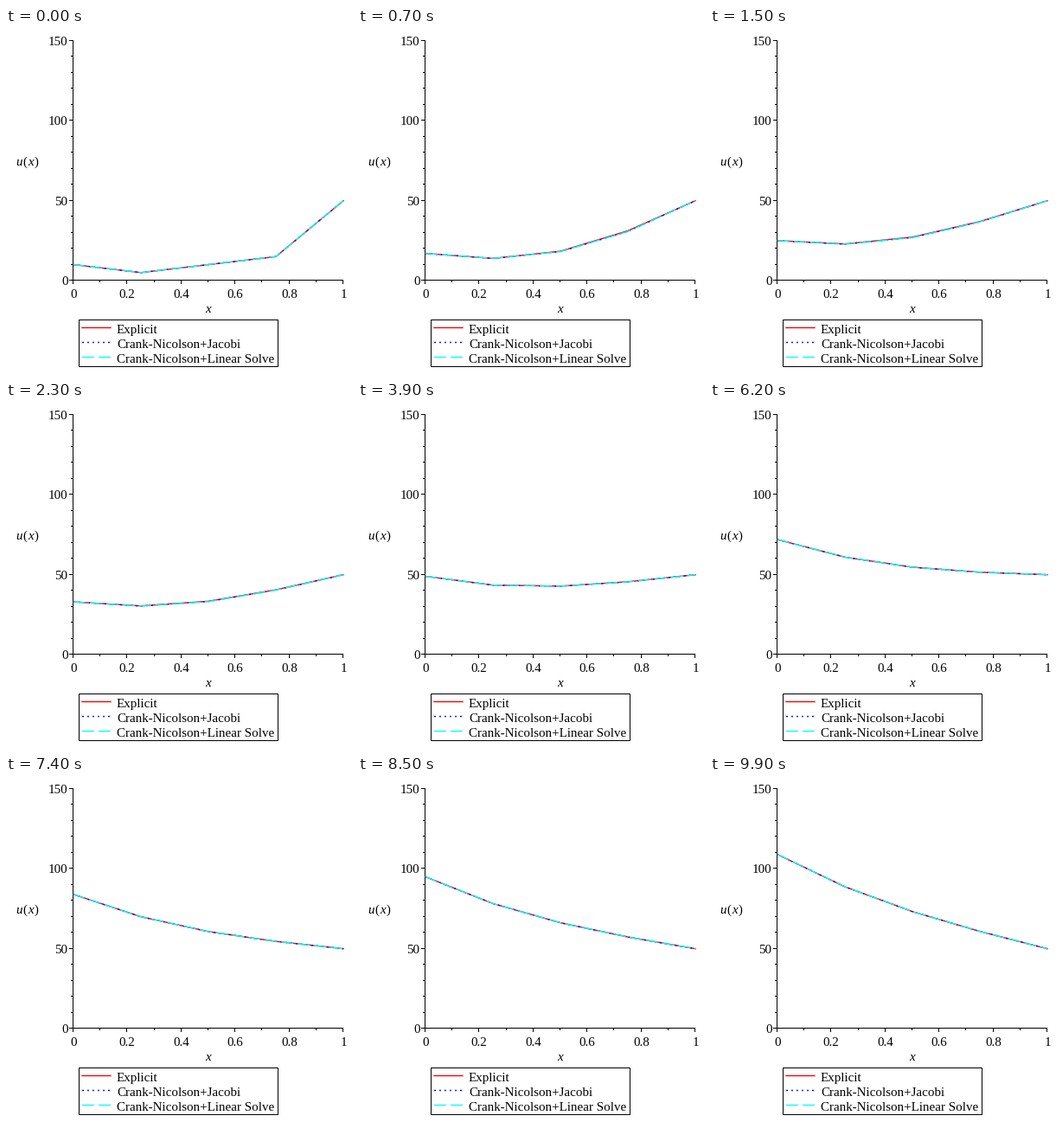
A matplotlib script that plays this animation: 400 by 400 pixels, repeating every 10000 ms.

```python
import matplotlib.pyplot as plt
import numpy as np
from matplotlib.animation import FuncAnimation
from matplotlib.patches import Rectangle

plt.rcParams.update({
    "font.family": "Liberation Serif",
    "lines.scale_dashes": False,
})

SIZE, DPI, STEPS = 400, 100, 100
PT = 72 / DPI
X0, X1, Y0, Y1 = 78, 390, 292, 15
U_MAX = 150
NODES = np.linspace(0, 1, 5)
R = 0.01 / 0.25 ** 2
STYLES = [("red", "-"),
          ("blue", (0, (2 * PT, 4 * PT))),
          ("cyan", (0, (14 * PT, 5 * PT)))]
NAMES = ["Explicit", "Crank-Nicolson+Jacobi", "Crank-Nicolson+Linear Solve"]


def px(x):
    return X0 + (X1 - X0) * x


def py(u):
    return Y0 + (Y1 - Y0) * u / U_MAX


def solve(theta):
    """Heat equation with a rising left end; theta weights the new time level."""
    lap = R * (np.diag([-2.0] * 3) + np.diag([1.0] * 2, 1) + np.diag([1.0] * 2, -1))
    eye = np.eye(3)
    u = np.array([5.0, 10.0, 15.0])
    rows = []
    for n in range(STEPS):
        rows.append([10 + n, *u, 50])
        edge = R * np.array([10 + n + theta, 0, 50])
        u = np.linalg.solve(eye - theta * lap, (eye + (1 - theta) * lap) @ u + edge)
    return np.array(rows)


explicit, crank = solve(0), solve(0.5)
runs = [explicit, crank, crank]

fig = plt.figure(figsize=(SIZE / DPI, SIZE / DPI), dpi=DPI, facecolor="white")
ax = fig.add_axes([0, 0, 1, 1])
ax.set(xlim=(0, SIZE), ylim=(SIZE, 0))
ax.axis("off")


def rule(x, y, w, h):
    """Solid black bar on whole pixels."""
    ax.add_patch(Rectangle((x, y), w, h, fc="black", lw=0, antialiased=False,
                           zorder=1))


def label(x, y, s, ha="center", style="normal"):
    ax.text(x, y, s, size=15 * PT, ha=ha, va="baseline", style=style)


def curve(x, y, style):
    color, dash = style
    return ax.plot(x, y, color=color, ls=dash, lw=1.4 * PT, snap=False,
                   solid_capstyle="projecting", dash_capstyle="butt", zorder=2)[0]


rule(X0 - 1, Y1 - 1, 1, Y0 - Y1 + 1)
rule(X0 - 1, Y0 - 1, X1 - X0 + 1, 1)

for i in range(16):
    y = round(py(10 * i))
    length = 2 if i % 5 else 4
    rule(X0 - 1 - length, y - 1, length, 1)
    if i % 5 == 0:
        label(71.5, y + 5, str(10 * i), ha="right")

for i in range(11):
    x = round(px(i / 10))
    rule(x - 1, Y0, 1, 2 if i % 2 else 4)
    if i % 2 == 0:
        label(x, 312, f"{i / 10:g}")

label(233.5, 329, "x", style="italic")
label(11, 159, "u", "left", "italic")
label(19.5, 159, "(", "left")
label(25, 159, "x", "left", "italic")
label(33, 159, ")", "left")

ax.add_patch(Rectangle((83.5, 336.5), 230, 54, fill=False, ec="black",
                       lw=PT, snap=True))
for i, (name, style) in enumerate(zip(NAMES, STYLES)):
    y = 346.5 + 17 * i
    curve([88, 121], [y, y], style)
    label(128, y + 6.5, name, ha="left")

lines = [curve(px(NODES), py(run[0]), style) for run, style in zip(runs, STYLES)]


def update(n):
    for line, run in zip(lines, runs):
        line.set_ydata(py(run[n]))
    return lines


anim = FuncAnimation(fig, update, frames=STEPS, interval=100, repeat=True,
                     repeat_delay=0)
plt.show()
```
